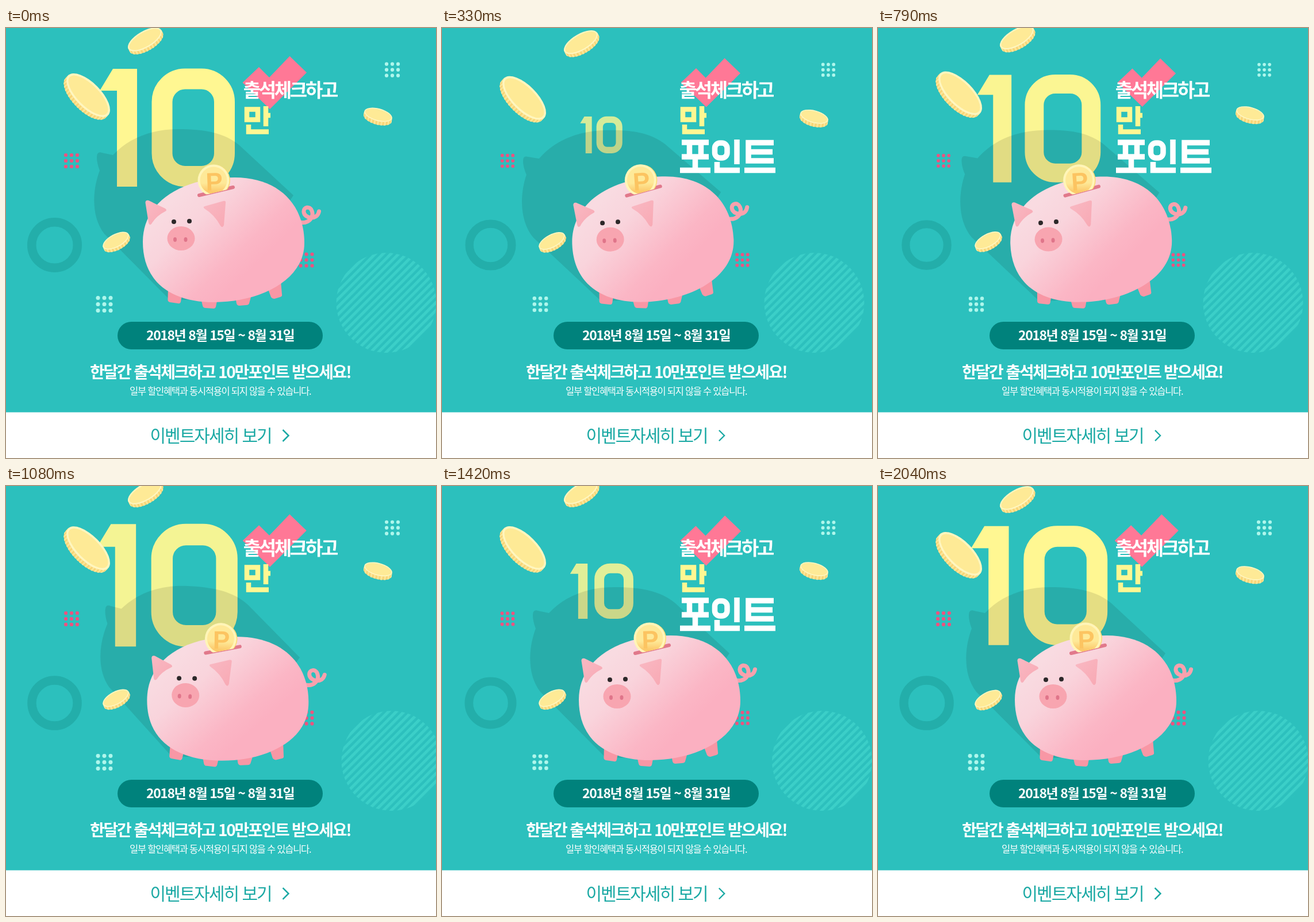
Animation, 748 px wide and 748 px high, one loop 2080 ms. Source, as an HTML page:

```html
<!DOCTYPE html>
<html lang="ko">
<head>
<meta charset="utf-8">
<title>출석체크 이벤트</title>
<style>
  html, body { margin: 0; width: 100%; height: 100%; overflow: hidden; background: #2cc0bd; }
  svg { display: block; width: 100vw; height: 100vh; }
  text { font-family: "Noto Sans CJK KR", "Noto Sans CJK", "Noto Sans KR", sans-serif; fill: #fff; }
  .bold { font-weight: 700; }
</style>
</head>
<body>
<svg viewBox="0 0 748 748">
  <defs>
    <linearGradient id="skin" gradientUnits="userSpaceOnUse" x1="300" y1="290" x2="425" y2="420">
      <stop offset="0" stop-color="#f9dbe1"/>
      <stop offset=".3" stop-color="#f9d4dc"/>
      <stop offset=".8" stop-color="#fbb6c5"/>
      <stop offset="1" stop-color="#fbb0c1"/>
    </linearGradient>
    <linearGradient id="ear" x1="0" y1="0" x2="1" y2="1">
      <stop offset="0" stop-color="#f9b9c3"/>
      <stop offset="1" stop-color="#f8a9b4"/>
    </linearGradient>
    <linearGradient id="gold" x1="0" y1="0" x2="0" y2="1">
      <stop offset=".6" stop-color="#fee998"/>
      <stop offset="1" stop-color="#fbc15f"/>
    </linearGradient>
    <pattern id="stripes" width="9.6" height="9.6" patternUnits="userSpaceOnUse" patternTransform="rotate(-45)">
      <rect width="9.6" height="5" fill="#3bcfc8"/>
    </pattern>
    <clipPath id="aboveSlot"><path d="M320 225H410V275L330 294Z"/></clipPath>
  </defs>

  <rect width="748" height="748" fill="#2cc0bd"/>
  <circle id="disc" cx="661.5" cy="478" r="87" fill="url(#stripes)"/>
  <g id="pulsing"></g>

  <g id="ten" fill="#fff792" role="img" aria-label="10">
    <path d="M163 109L186 71H228V276H193V109Z"/>
    <rect x="271.5" y="88.5" width="108.5" height="169.5" rx="40" fill="none" stroke="#fff792" stroke-width="36"/>
  </g>

  <g id="pig">
    <path opacity=".1" d="M286 474L171 358C149 330 149 285 163 248C158 235 157 224 159 219Q161 215 167 217L186 221C215 190 255 176 300 176C345 176 380 182 406 204L500 291L380 470Z"/>
    <path d="M511 338C528 341 536 328 532 318C529 309 517 311 518 320C519 331 541 336 544.500 319" fill="none" stroke="#f9a1ad" stroke-width="7" stroke-linecap="round"/>
    <g fill="#f897a5">
      <path d="M282 452L307 460L304 476Q303 480 299 479L285 477Q281 476 281.500 472Z"/>
      <path d="M339 470H368L365 485Q364 488 361 488L347 487Q343 487 342 483Z"/>
      <path d="M399 468H426L423 479Q422 482 418 482L406 483Q402 483 401 479Z"/>
      <path d="M455 452L478 440L480 463Q481 467 477 468L467 471Q463 471 461 468Z"/>
    </g>
    <path d="M238 372C238 304 303 260 398 260C474 260 519 307 519 374C519 440 440 477 362 477C285 477 238 440 238 372Z" fill="url(#skin)"/>
    <path d="M336 291L395 277" stroke="#e1798b" stroke-width="6" stroke-linecap="round"/>
    <g clip-path="url(#aboveSlot)">
      <circle cx="363" cy="265" r="27" fill="#fbd873"/>
      <circle cx="361" cy="265" r="27.500" fill="#fff5b8"/>
      <circle cx="361" cy="265" r="23.500" fill="url(#gold)"/>
      <text x="347.500" y="282.500" transform="rotate(-2 361 265)" style="font:700 44px 'Liberation Sans',sans-serif;fill:#fcc461">P</text>
    </g>
    <g fill="url(#ear)">
      <path d="M242.500 304Q242.500 299 248 300L277 314Q281 317 277 319Q261 327 253 341Q249 344 248 339Z"/>
      <path d="M345 314Q342 311 346 310L378 301Q383 300 382 305L379 343Q377 349 373 344Q363 325 345 314Z"/>
    </g>
    <g fill="#2c2829"><circle cx="292" cy="337" r="4"/><circle cx="319" cy="336" r="4"/></g>
    <ellipse cx="304.500" cy="366" rx="24" ry="21" fill="#f8a5b0"/>
    <g fill="#e0758a"><ellipse cx="294" cy="368" rx="3" ry="4"/><ellipse cx="312.500" cy="368" rx="3" ry="4"/></g>
  </g>

  <g id="coins"></g>

  <path id="check" d="M411.500 95L440 68L458 86L493.500 49L523 77.500L459 141Z" fill="#ff7896"/>
  <text class="bold" x="412.700" y="120" font-size="33" letter-spacing="-3.300">출석체크하고</text>
  <g fill="none" stroke="#fff792" stroke-width="8.500" role="img" aria-label="만">
    <path d="M419 141.500H438V159.500H419ZM452 136V171M452 152H460M422 168V180.500H457"/>
  </g>
  <g id="points" fill="none" stroke="#fff" stroke-width="9.500" role="img" aria-label="포인트">
    <path d="M417 199H464M430.500 199V224M450.500 199V224M417 224H464M440.500 224V246M414 247.500H467"/>
    <rect x="474.500" y="200" width="21.500" height="26" rx="9"/>
    <path d="M513 194V237M478.500 233V247.500H518"/>
    <path d="M577 199.500H533V231H577M533 215.500H575M526 247.500H580"/>
  </g>

  <rect x="194" y="511" width="357" height="48" rx="24" fill="#00827c"/>
  <text class="bold" x="244" y="543" font-size="23" letter-spacing="-1.430">2018년 8월 15일 ~ 8월 31일</text>
  <text class="bold" x="146" y="608.500" font-size="28" letter-spacing="-2.240">한달간 출석체크하고 10만포인트 받으세요!</text>
  <text x="215" y="638" font-size="16.500" font-weight="300" letter-spacing="-1.280">일부 할인혜택과 동시적용이 되지 않을 수 있습니다.</text>

  <rect y="668.500" width="748" height="80" fill="#fff"/>
  <text x="250.500" y="720" font-size="30" letter-spacing="-2">이벤트자세히 보기</text>
  <path id="chevron" d="M481.500 699L491.500 709L481.500 719" fill="none" stroke="#1ba9a4" stroke-width="2.500"/>
</svg>

<script>
const LOOP = 2080, FRAME = 1000 / 24, LAST = 49;
const byId = id => document.getElementById(id);

document.querySelector("text[y='720']").style.fill = "#1ba9a4";

function add(parent, tag, attrs) {
  const el = document.createElementNS("http://www.w3.org/2000/svg", tag);
  for (const name in attrs) el.setAttribute(name, attrs[name]);
  return parent.appendChild(el);
}

// Parts that swell and shrink around their own centre
const pulsing = [[byId("check"), 467.5, 95], [byId("chevron"), 487, 709]];

function addPulsing(cx, cy) {
  const group = add(byId("pulsing"), "g", {});
  pulsing.push([group, cx, cy]);
  return group;
}

function addDots(cx, cy, pitch, r, fill) {
  const group = addPulsing(cx, cy);
  for (let i = 0; i < 9; i++) {
    add(group, "circle", { cx: cx + (i % 3 - 1) * pitch, cy: cy + (Math.floor(i / 3) - 1) * pitch, r, fill });
  }
}

add(addPulsing(84.5, 377.5), "circle",
  { cx: 84.5, cy: 377.5, r: 39.8, fill: "none", stroke: "#23aeaa", "stroke-width": 15.5 });
addDots(672, 72.7, 10, 3.1, "#aef6ec");
addDots(171, 480.5, 11, 3.5, "#aef6ec");
addDots(114, 231, 10, 3.1, "#ee527f");
addDots(522.5, 403.5, 10, 3.1, "#ee527f");

// Floating coins: a ridged edge swept from the back, then the face
function addCoin(x, y, rx, ry, angle, dx, dy, reach) {
  const group = add(byId("coins"), "g", {});
  const oval = (shift, inset, paint) => {
    const cx = x + dx * shift, cy = y + dy * shift;
    add(group, "ellipse", { cx, cy, rx: rx - inset, ry: ry - inset, transform: `rotate(${angle} ${cx} ${cy})`, ...paint });
  };
  for (let k = 4; k > 0; k--) {
    oval(k / 4, 0, { fill: "#f9d475" });
    oval(k / 4, 0.5, { fill: "none", stroke: "#fdeaa0", "stroke-width": 1.4, "stroke-dasharray": "3 3" });
  }
  oval(0, 0, { fill: "#fff6bf" });
  oval(0, rx * 0.075, { fill: "#feea96" });
  return { group, reach };
}

const coins = [
  addCoin(241.5, 20, 33, 14.5, -30, 2.5, 5, 1),
  addCoin(143, 117, 49, 22, 45, -4.5, 4.5, 1),
  addCoin(647.5, 151, 25, 11, 15, -1, 6, 0.7),
  addCoin(191, 370, 25, 11.5, -28, 2, 4.5, 0.12)
];

const linear = u => u;
const smooth = u => (1 - Math.cos(Math.PI * u)) / 2;

function track(keys, frame, ease = linear) {
  const next = keys.findIndex(key => key[0] > frame);
  if (next < 0) return keys[keys.length - 1][1];
  const [f0, v0] = keys[next - 1], [f1, v1] = keys[next];
  return v0 + (v1 - v0) * ease((frame - f0) / (f1 - f0));
}

const SWING = [0, 8, 14, 19, 26, 34];
const swing = values => SWING.map((frame, i) => [frame, values[i]]);
const pigTilt = swing([0, -2.15, 3.9, -1.9, 2.7, 0]);
const pigSlide = swing([0, -7.3, -3.5, -4, 2, 0]);
const discSlide = swing([0, -14, 7, -9, 9, -0.5]).concat([[37, 0]]);
const drift = [[0, 0], [7, 5.5], [30, -11.7], [49, 1]];
const tenHeight = [[0, 205], [4, 120], [7, 34], [8, 64], [9, 92], [14, 148], [19, 187], [23, 206], [26, 213],
  [29, 130], [32, 34], [33, 64], [34, 96], [39, 148], [44, 187], [49, 207]];
const tenOpacity = [[0, 1], [7, 0.78], [14, 0.93], [19, 0.98], [24, 1], [26, 0.95], [32, 0.8], [34, 0.86], [39, 0.93], [46, 1]];

const scaleAbout = (s, x, y) => `translate(${x} ${y}) scale(${s}) translate(${-x} ${-y})`;

function draw(time) {
  const frame = Math.min(LAST, Math.floor((time % LOOP + 3.4) / FRAME));
  const set = (el, value) => el.setAttribute("transform", value);

  const pulse = 1 - 0.09 * smooth(frame / 6.25);
  for (const [el, x, y] of pulsing) set(el, scaleAbout(pulse, x, y));

  const y = track(drift, frame);
  for (const { group, reach } of coins) set(group, `translate(0 ${y * reach})`);

  set(byId("disc"), `translate(${track(discSlide, frame, smooth)} 0)`);
  set(byId("pig"), `translate(${track(pigSlide, frame, smooth)} 0) rotate(${track(pigTilt, frame, smooth)} 350 487)`);

  set(byId("ten"), scaleAbout(track(tenHeight, frame) / 205, 275.5, 191.5));
  byId("ten").setAttribute("opacity", track(tenOpacity, frame));

  const beat = frame % 25;
  byId("points").setAttribute("visibility", beat >= 4 && beat < 22 ? "visible" : "hidden");
}

const start = performance.now();
function tick() {
  draw(performance.now() - start);
  requestAnimationFrame(tick);
}
tick();
</script>
</body>
</html>
```
